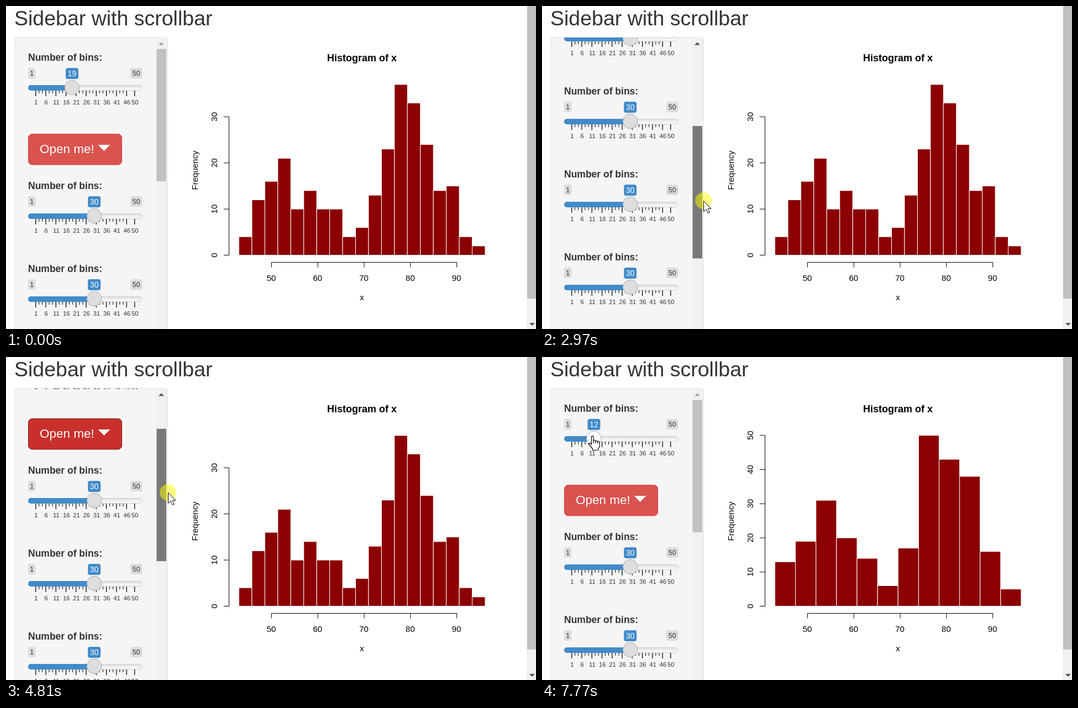
An HTML page for the animation above (8 s loop, 959 by 584 pixels).

```html
<!DOCTYPE html>
<html lang="en">
<head>
<meta charset="utf-8">
<title>Sidebar with scrollbar</title>
<style>
@property --s { syntax: "<number>"; inherits: true; initial-value: 0; }
html, body { margin: 0; width: 100%; height: 100%; overflow: hidden; background: #fff; }
svg { display: block; width: 959px; height: 584px; }
text { font-family: "Liberation Sans", Arial, sans-serif; fill: #333; }
.mid { text-anchor: middle; }
.bold { font-weight: bold; }
.plot text { font-size: 15px; fill: #000; text-anchor: middle; }
.axis { stroke: #000; fill: none; }

/* 1% of the loop is 80 ms; the small lead keeps step edges crisp */
.side, .cursor, .arrow, .hand, .ring, .before, .after, .old, .new,
.smear, .thumb, .btn, .up {
  animation: 8s step-end -3ms infinite;
}
.side { animation-name: scroll; }
.content { transform: translateY(calc(var(--s) * -1px)); }
.thumb { transform: translateY(calc(var(--s) * .434px)); animation-name: thumb; }
.cursor { animation-name: move; }
.arrow { animation-name: arrow; }
.hand { animation-name: hand; }
.ring { animation-name: ring; }
.before { animation-name: before; }
.after { animation-name: after; }
.old { animation-name: old; }
.new { animation-name: new; }
.smear { animation-name: smear; }
.btn { animation-name: btn; }
.up { animation-name: up; }

@keyframes scroll {
  0%, 100% { --s: 0; }
  30.125% { --s: 2; }
  31% { --s: 2; animation-timing-function: steps(3, start); }
  33.625% { --s: 90; animation-timing-function: steps(5, start); }
  38% { --s: 321; animation-timing-function: steps(3, start); }
  40.625% { --s: 440; animation-timing-function: steps(4, start); }
  44.125% { --s: 537; }
  53.125% { --s: 537; animation-timing-function: steps(2, start); }
  54.875% { --s: 490; animation-timing-function: steps(7, start); }
  61% { --s: 120; animation-timing-function: steps(3, start); }
  63.625% { --s: 18; animation-timing-function: steps(3, start); }
  66.25% { --s: 0; }
}
@keyframes move {
  0% { transform: translate(481px, 411px); }
  7.5% { transform: translate(411px, 336px); }
  12.5% { transform: translate(411px, 336px); animation-timing-function: steps(6, start); }
  18.25% { transform: translate(262px, 240px); animation-timing-function: steps(3, start); }
  21.125% { transform: translate(284px, 203px); }
  30.125% { transform: translate(284px, 208px); }
  31% { transform: translate(284px, 208px); animation-timing-function: steps(3, start); }
  33.625% { transform: translate(287px, 250px); animation-timing-function: steps(5, start); }
  38% { transform: translate(292px, 352px); animation-timing-function: steps(3, start); }
  40.625% { transform: translate(292px, 400px); animation-timing-function: steps(4, start); }
  44.125% { transform: translate(290px, 438px); }
  53.125% { transform: translate(290px, 438px); animation-timing-function: steps(2, start); }
  54.875% { transform: translate(291px, 400px); animation-timing-function: steps(7, start); }
  61% { transform: translate(293px, 245px); animation-timing-function: steps(3, start); }
  63.625% { transform: translate(295px, 208px); animation-timing-function: steps(3, start); }
  66.25% { transform: translate(296px, 200px); }
  68.625% { transform: translate(296px, 200px); animation-timing-function: steps(6, start); }
  74.2875% { transform: translate(150px, 165px); animation-timing-function: steps(5, start); }
  79%, 100% { transform: translate(92px, 142px); }
}
@keyframes arrow { 0%, 97.125%, 100% { opacity: 0; } 6.625% { opacity: 1; } }
@keyframes hand { 0% { opacity: 0; } 97.125%, 100% { opacity: 1; } }
@keyframes ring {
  0%, 68.625%, 89.75%, 100% { opacity: 0; }
  26.75%, 86.375% { opacity: .5; }
}
@keyframes before { 0% { opacity: 1; } 88.875%, 100% { opacity: 0; } }
@keyframes after { 0% { opacity: 0; } 88.875%, 100% { opacity: 1; } }
@keyframes old { 0% { opacity: 1; } 93.875%, 100% { opacity: 0; } }
@keyframes new { 0% { opacity: 0; } 93.875%, 100% { opacity: 1; } }
@keyframes smear { 0%, 88.875%, 100% { opacity: 0; } 79% { opacity: 1; } }
@keyframes thumb {
  0%, 69.6%, 100% { fill: #c1c1c1; }
  19.2%, 68.625% { fill: #a8a8a8; }
  26.75% { fill: #787878; }
}
@keyframes btn {
  0%, 86.375%, 100% { fill: #d9534f; stroke: #d43f3a; }
  26.75% { fill: #c9302c; stroke: #761c19; }
}
@keyframes up { 0%, 65.375%, 100% { fill: #a3a3a3; } 31% { fill: #505050; } }
</style>
</head>
<body>
<svg viewBox="0 0 959 584">
  <defs>
    <clipPath id="view"><rect x="16" y="57" width="254" height="527"/></clipPath>
    <linearGradient id="line" x2="0" y2="1">
      <stop stop-color="#dedede"/><stop offset="1" stop-color="#fff"/>
    </linearGradient>
  </defs>

  <text x="15" y="35" font-size="37.5">Sidebar with scrollbar</text>

  <g class="side">
    <rect x="15.5" y="56.5" width="277" height="560" rx="5" fill="#f5f5f5" stroke="#e3e3e3"/>
    <g clip-path="url(#view)">
      <g class="content" id="content">
        <rect class="btn" x="40.5" y="231.5" width="169" height="55.5" rx="7"/>
        <text x="61" y="265.5" font-size="22.5" style="fill:#fff">Open me!</text>
        <path d="M166.500 251h22l-11 11z" fill="#fff"/>
      </g>
    </g>
    <rect x="270.500" y="57" width="21.500" height="527" fill="#f1f1f1"/>
    <path class="up" d="M276 70.500l5-5 5 5z"/>
    <rect class="thumb" x="272.500" y="77.700" width="17.500" height="239.300"/>
  </g>

  <g class="plot">
    <text class="bold" x="644" y="100" style="font-size:18px">Histogram of x</text>
    <text x="644" y="532">x</text>
    <text transform="translate(347 297) rotate(-90)">Frequency</text>
    <g id="xaxis"></g>
    <g class="old" id="old"></g>
    <g class="new" id="new"></g>
  </g>

  <rect x="942" width="17" height="584" fill="#f1f1f1"/>
  <rect x="943" width="16" height="529" fill="#c1c1c1"/>
  <path d="M947 573h10l-5 5z" fill="#505050"/>

  <path class="smear" d="M94 144h12.500v9h-4z" fill="#858585"/>
  <g class="cursor">
    <circle class="ring" r="15" fill="#ff0"/>
    <path class="arrow" d="M.5.5V19.500L5 15.500 8.200 22.500 11.300 21.200 8.200 14.200H14.200Z" fill="#fff" stroke="#000"/>
    <g class="hand" stroke="#000" stroke-width="1.200" stroke-linejoin="round" fill="#fff">
      <path d="M-2.500 16V2.500Q-2.500 .8-.7 .8T1.200 2.500V9Q3.500 7.500 5 9.700 7.500 8.500 8.700 10.700 12.200 10 12.200 13.500V18Q12.200 21 9.700 23.500V26.500H-.5V24L-7 16Q-7.500 13.500-5 13.500Z"/>
      <path d="M1.200 9V14M5 10V14M8.700 11V14.500" fill="none"/>
    </g>
  </g>
</svg>
<script>
const byId = id => document.getElementById(id);
const range = (n, f) => Array.from({ length: n }, (_, i) => f(i)).join('');
const pos = v => 53.75 + (v - 1) * 3.653;

function tag(x, w, label) {
  return `<rect x="${x}" y="112" width="${w}" height="19" rx="4" fill="#000" fill-opacity=".1"/>
    <text class="mid" x="${x + w / 2}" y="126" font-size="12.500">${label}</text>`;
}

function tick(x, h) {
  return `<rect x="${x - .6}" y="153" width="${h > 6 ? 1.25 : 1}" height="${h}" fill="#000"/>`;
}

// Big ticks every five units, two small ones between them
const grid = range(11, i => {
  const v = Math.min(50, 1 + i * 5);
  const small = i < 9 ? tick(pos(v + 5 / 3), 5) + tick(pos(v + 10 / 3), 5) : '';
  return tick(pos(v), 10) + small +
    `<text class="mid" x="${pos(v) + .6}" y="178.300" font-size="11.250">${v}</text>`;
});

function knob(v, fill = '#dedede') {
  const x = pos(v);
  return `<rect x="40" y="143" width="${x - 40}" height="10" rx="5" fill="#428bca"/>
    <rect x="${x - 11.5}" y="112" width="23" height="20" rx="4" fill="#428bca"/>
    <text class="mid" x="${x}" y="126.500" font-size="13.750" style="fill:#fff">${v}</text>
    <circle cx="${x}" cy="147.300" r="13.200" fill="${fill}" stroke="#aaa"/>`;
}

function slider(dy, knobs) {
  return `<g transform="translate(0 ${dy})">
    <text class="bold" x="40" y="99" font-size="17.500">Number of bins:</text>
    ${tag(40, 13.5, 1)}${tag(225, 21.5, 50)}${grid}
    <rect x="40.500" y="143.500" width="205.500" height="9" rx="4.500" fill="url(#line)" stroke="#ccc"/>
    ${knobs}</g>`;
}

byId('content').innerHTML +=
  slider(0, `<g class="before">${knob(19)}</g><g class="after">${knob(12, '#fff')}</g>`) +
  range(6, i => slider(232 + i * 150, knob(30)));

function hist(counts, unit, top) {
  const w = 445.5 / counts.length, base = 450.5;
  const bars = counts.map((c, i) =>
    `<rect x="${421.5 + i * w}" y="${base - c * unit}" width="${w}" height="${c * unit}" fill="#8b0000" stroke="#fff"/>`).join('');
  const marks = range(top / 10 + 1, i => {
    const y = base - i * 10 * unit;
    return `<path class="axis" d="M394 ${y}h9.500"/>
      <text transform="translate(382 ${y}) rotate(-90)">${i * 10}</text>`;
  });
  return bars + marks + `<path class="axis" d="M403.500 ${base}V${base - top * unit}"/>`;
}

byId('old').innerHTML =
  hist([4, 12, 16, 21, 10, 14, 10, 10, 4, 6, 13, 23, 37, 33, 24, 14, 15, 4, 2], 8.34, 30);
byId('new').innerHTML =
  hist([13, 19, 31, 20, 14, 6, 17, 50, 43, 38, 16, 5], 6.175, 50);
byId('xaxis').innerHTML = '<path class="axis" d="M480 463.500H816"/>' + range(5, i => {
  const x = 480.5 + i * 83.8;
  return `<path class="axis" d="M${x} 463.500v9"/><text x="${x - .5}" y="497">${50 + i * 10}</text>`;
});
</script>
</body>
</html>
```
